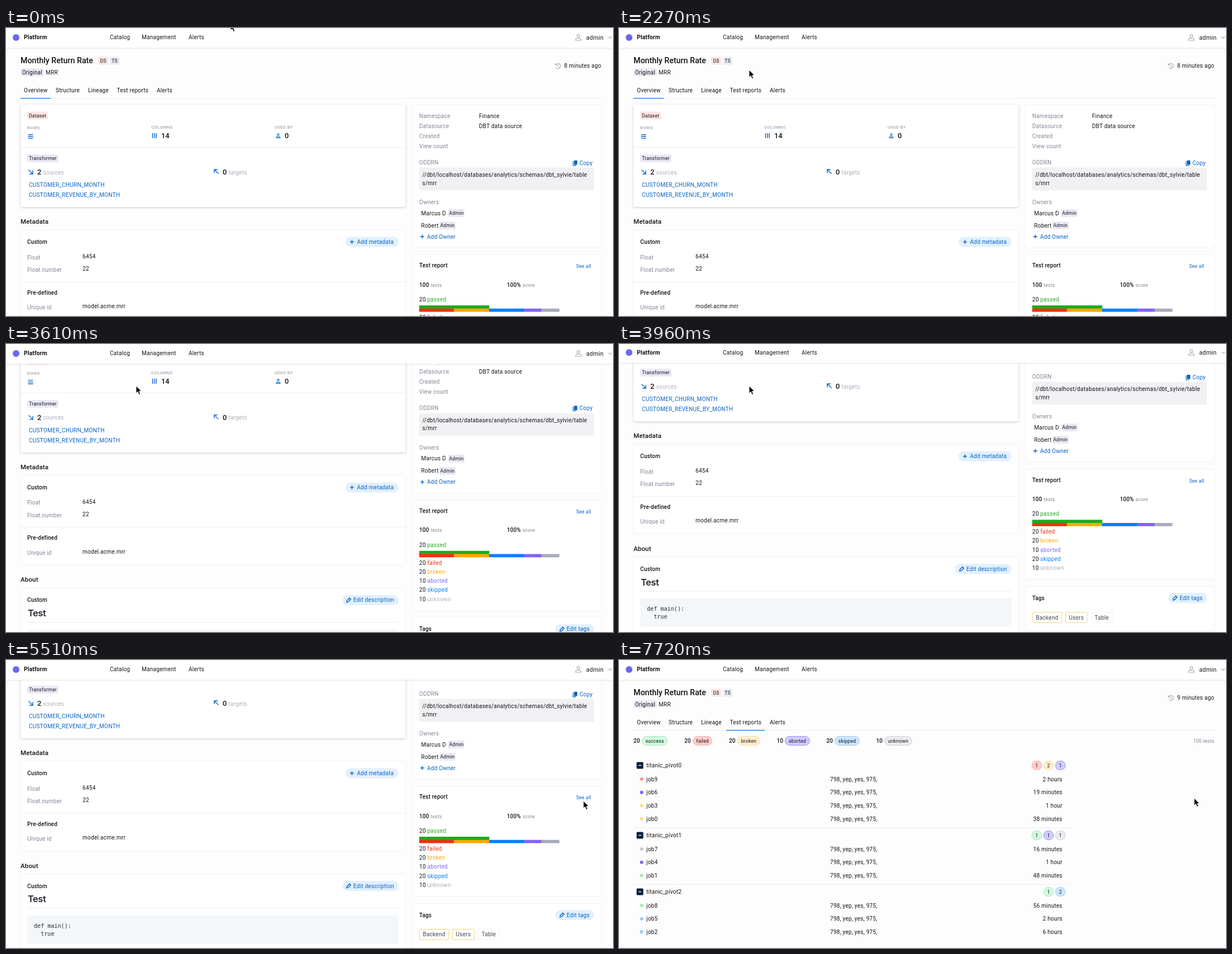
Animation, 1087 px wide and 515 px high, one loop 8000 ms. Source, as an HTML page:

```html
<!DOCTYPE html>
<html lang="en">
<head>
<meta charset="utf-8">
<title>Data catalog</title>
<style>
  html, body { margin: 0; width: 100%; height: 100%; overflow: hidden; background: #fdfdfe; }
  svg { display: block; width: 100%; height: 100%; }
  text { font-family: Roboto, "Liberation Sans", sans-serif; letter-spacing: .23px; fill: #131417; white-space: pre; }
  .med { font-weight: 500; letter-spacing: .14px; }
  .bold { font-weight: 700; letter-spacing: .15px; }
  .big { font-weight: 500; letter-spacing: 0; }
  .label { fill: #7f8695; }
  .pale { fill: #a9aeba; }
  .caps { fill: #9fa5b3; font-weight: 500; letter-spacing: .4px; }
  .link { fill: #0663c7; }
  .end { text-anchor: end; }
  .mid { text-anchor: middle; }
  .code { font-family: "DejaVu Sans Mono", monospace; letter-spacing: 0; fill: #24292e; }
  .h1 { font-family: Inter, sans-serif; font-weight: 600; letter-spacing: -.5px; fill: #24292e; }
  .card { fill: #fff; stroke: #f1f1f4; }
  .raised { fill: #fff; filter: drop-shadow(0 1px 2px rgba(20, 25, 50, .22)); }
  .bar { fill: #fff; filter: drop-shadow(0 1px 1px rgba(20, 25, 50, .12)); }
  .line { fill: none; stroke: #ededf1; }
  .ico { fill: none; stroke: #0663c7; stroke-width: 1.4; }
  .thin { fill: none; stroke: #0663c7; stroke-width: 1.1; }
  .grey { fill: none; stroke: #a3a8b4; stroke-width: 1.1; }
</style>
</head>
<body>
<svg viewBox="0 0 1087 515" preserveAspectRatio="none">
  <g id="page">
    <g id="body"></g>
    <g id="top"></g>
  </g>
  <rect id="status" x="-4" y="513.4" width="335" height="10" rx="3" fill="#e9e9ec"/>
  <path id="cursor" d="M0 0V13.2L3 10.4L5.3 15.6L7.6 14.6L5.4 9.6H9.6Z" fill="#000" stroke="#fff" stroke-width=".9"/>
</svg>
<script>
const $ = id => document.getElementById(id);
const BASE = 10.05, SMALL = 8.6;

// y is the middle of the capitals
const txt = (x, y, s, cls = '', size = BASE, fill = '') =>
  `<text x="${x}" y="${(y + size * .355).toFixed(2)}" font-size="${size}" class="${cls}"` +
  `${fill ? ` style="fill:${fill}"` : ''}>${s}</text>`;
const box = (x, y, x2, y2, fill, r = 0, stroke = 'none') =>
  `<rect x="${x}" y="${y}" width="${x2 - x}" height="${y2 - y}" rx="${r}" fill="${fill}" stroke="${stroke}"/>`;
const panel = (x, y, x2, y2, cls = 'card') =>
  `<rect x="${x}" y="${y}" width="${x2 - x}" height="${y2 - y}" rx="3" class="${cls}"/>`;
const path = (d, cls = 'ico') => `<path d="${d}" class="${cls}"/>`;
const plus = (x, y) => path(`M${x - 3.5} ${y}h7M${x} ${y - 3.5}v7`);
const pencil = (x, y) => path(`M${x - 3.5} ${y + 3.7}l.5 -2.8l4.6 -4.6l2.3 2.3l-4.6 4.6z`);
const pill = (x, y, x2, label, tx) =>
  box(x, y - 9, x2, y + 9, '#e2f0fd', 9) + txt(tx, y, label, 'link');
const badge = (x, y, x2, label, fill = '#e9e9f6', size = SMALL) =>
  box(x, y - 7, x2, y + 7, fill, 2) + txt((x + x2) / 2, y, label, 'mid', size);

const GREEN = ['#d1fadf', '#a8e8bc'], RED = ['#ffcccc', '#f7aeae'], YELLOW = ['#ffeecc', '#f8dea6'],
  PURPLE = ['#d1ccff', '#9a8ff0'], BLUE = ['#cce6ff', '#a0cbf3'], GREY = ['#ebebef', '#cfcfd7'];
const tag = (x, y, x2, label, [fill, edge]) =>
  box(x + .5, y - 8, x2 - .5, y + 8, fill, 8, edge) + txt((x + x2) / 2, y, label, 'mid', SMALL);

function header() {
  const y = 16.7;
  return panel(-5, -10, 1092, 35.5, 'bar') +
    '<circle cx="18" cy="17" r="6" fill="#6a68f2"/>' +
    txt(32, y, 'Platform', 'bold', 10.3) +
    txt(186, y, 'Catalog') + txt(243, y, 'Management') + txt(327, y, 'Alerts') +
    '<circle cx="1025" cy="14.3" r="2.4" class="grey"/>' +
    path('M1020 22v-1.2c0-3.4 10-3.4 10 0v1.2z', 'grey') +
    txt(1039, y, 'admin', '', 10.8) + path('M1079 15.5l3 3l3-3', 'grey');
}

function title(age, from, to) {
  const tabs = [[32, 'Overview'], [89, 'Structure'], [147, 'Lineage'], [198.4, 'Test reports'], [270, 'Alerts']];
  return txt(26, 58.3, 'Monthly Return Rate', 'big', 14.25) +
    badge(165, 58.5, 183, 'DS', '#fde4e2') + badge(186, 58.5, 203, 'TS') +
    badge(26.5, 79.3, 67, 'Original', '#e8e9f5', BASE) + txt(71, 79.3, 'MRR') +
    path('M984.5 65.5a4.6 4.6 0 1 1 0 5M983.5 63v3h3M988.3 65v3.2l2 1.2', 'grey') +
    txt(1066, 67.5, age + ' minutes ago', 'end') +
    tabs.map(([x, s]) => txt(x, 111.7, s)).join('') +
    path('M26 125.5H1066', 'line') + box(from, 125, to, 126.4, '#1483ea');
}

function leftColumn() {
  return panel(26, 137, 715.5, 320, 'raised') + path('M26 213.5H715', 'line') +
    badge(38, 156.5, 75, 'Dataset', '#fde4e2') +
    txt(38, 178.5, 'ROWS', 'caps', 7.6) + txt(260, 177.5, 'COLUMNS', 'caps', 7.6) +
    txt(481, 177.5, 'USED BY', 'caps', 7.6) +
    path('M39.5 191h9M39.5 194.2h9M39.5 197.4h9') + path('M262.5 188v9M265.8 188v9M269.1 188v9') +
    '<circle cx="487.5" cy="190.7" r="1.7" class="thin"/>' + path('M484 196.5v-.5c0-2.2 7-2.2 7 0v.5z', 'thin') +
    txt(278, 192.5, '14', 'big', 12.9) + txt(499, 192.5, '0', 'big', 12.9) +
    badge(38, 233, 94, 'Transformer') +
    path('M40.5 253.5l7 7M48 255v6h-6') + path('M380.5 260.5l-7 -7M373 259v-6h6') +
    txt(56, 257.5, '2', 'big', 12.9) + txt(66.5, 258, 'sources', 'pale') +
    txt(388, 257.5, '0', 'big', 12.9) + txt(398.5, 258, 'targets', 'pale') +
    txt(41, 280.5, 'CUSTOMER_CHURN_MONTH', 'link') +
    txt(41, 298.5, 'CUSTOMER_REVENUE_BY_MONTH', 'link') +

    txt(26, 346, 'Metadata', 'med', 11.5) + panel(26, 361.5, 715.5, 520.5) +
    path('M26 454H715', 'line') + txt(38, 382.5, 'Custom', 'med') +
    pill(608, 382.5, 703, 'Add metadata', 628.5) + plus(619.5, 382.5) +
    txt(38, 410, 'Float', 'label') + txt(137, 408.5, '6454') +
    txt(38, 432.5, 'Float.number', 'label') + txt(137, 430.5, '22') +
    txt(38, 473, 'Pre-defined', 'med') +
    txt(38, 499.5, 'Unique id', 'label') + txt(137, 497.5, 'model.acme.mrr') +

    txt(26, 547.5, 'About', 'med', 11.5) + panel(26, 562.5, 715.5, 720) +
    txt(38, 584, 'Custom', 'med') +
    pill(602, 584, 703, 'Edit description', 622) + pencil(613.5, 584) +
    txt(39, 607.5, 'Test', 'h1', 16.5) + path('M38 624H703', 'line') +
    box(38, 636.5, 703, 688, '#f4f7fa', 2) +
    txt(50, 655, 'def main():', 'code', 10.1) + txt(50, 669.5, '  true', 'code', 10.1);
}

function rightColumn() {
  const info = [['Namespace', 'Finance'], ['Datasource', 'DBT data source'], ['Created', ''], ['View count', '']];
  const bars = [[740, '#f2300f'], [802.5, '#ffa800'], [865, '#0080ff'], [928, '#8463fa'], [959, '#a8abb8'], [991]];
  const stats = [[20, 'failed', '#f2300f'], [20, 'broken', '#ffa800'], [10, 'aborted', '#8463fa'],
    [20, 'skipped', '#0080ff'], [10, 'unknown', '#adb0ba']];
  return panel(728, 137, 1066, 393) +
    info.map(([k, v], i) => txt(740, 157.7 + i * 17.8, k, 'label') + txt(847, 157.7 + i * 17.8, v)).join('') +
    txt(740, 240.5, 'ODDRN', 'label') + txt(1027, 241, 'Copy', 'link') +
    box(1017, 236.7, 1023, 244.5, '#0663c7', 1) + path('M1015.5 238.3v7.6h5.5', 'thin') +
    box(740, 249.5, 1053, 290.5, '#f1f1f4', 2) +
    txt(745.5, 262.5, '//dbt/localhost/databases/analytics/schemas/dbt_sylvie/table') +
    txt(745.5, 277, 's/mrr') +
    txt(740, 311.5, 'Owners', 'label') +
    txt(743.5, 331, 'Marcus D') + badge(792, 331, 821, 'Admin') +
    txt(743.5, 353, 'Robert') + badge(776, 353, 805, 'Admin') +
    plus(745.5, 373) + txt(754, 373, 'Add Owner', 'link') +

    panel(728, 405.5, 1066, 602.5) + txt(740, 424.8, 'Test report', 'med') +
    '<rect id="hover" x="1016" y="417.5" width="37.5" height="17.5" rx="2"/>' +
    txt(1021, 426.3, 'See all', 'link', SMALL) +
    txt(740, 459, '100', 'med') + txt(760.5, 459.5, 'tests', 'label', SMALL) +
    txt(897, 459, '100%', 'med') + txt(925, 459.5, 'score', 'label', SMALL) +
    txt(740, 485.5, '20') + txt(754.5, 485.5, 'passed', '', BASE, '#1faa1f') +
    box(740, 496, 865.5, 502, '#1faa1f') +
    bars.slice(0, -1).map(([x, c], i) => box(x, 501.7, bars[i + 1][0], 507.5, c)).join('') +
    stats.map(([n, s, c], i) =>
      txt(740, 517.4 + i * 16.2, n) + txt(754.5, 517.4 + i * 16.2, s, '', BASE, c)).join('') +

    panel(728, 615, 1066, 695) + txt(740, 636, 'Tags', 'med') +
    pill(984, 636, 1053, 'Edit tags', 1004) + pencil(995.5, 636) +
    [[740, 793, 'Backend', '#f6d27a'], [799, 839, 'Users', '#f6d27a'], [845, 884, 'Table', '#f1f1f4']]
      .map(([a, b, s, c]) => box(a + .5, 661.5, b, 680, '#fff', 2.5, c) +
        txt((a + b) / 2, 670.7, s, 'mid', BASE, '#42464f')).join('');
}

function reports() {
  const totals = [[26, 41, 87, 20, 'success', GREEN], [117, 132, 167, 20, 'failed', RED],
    [197, 212, 253, 20, 'broken', YELLOW], [282.5, 297, 342, 10, 'aborted', PURPLE],
    [371.5, 386, 431, 20, 'skipped', BLUE], [460.5, 475, 525, 10, 'unknown', GREY]];
  const red = '#ff9090', violet = '#7a62fa', amber = '#ffdb8f', grey = '#c4c6d0', green = '#a0eda6', blue = '#90caff';
  const groups = [
    [188, [[1, RED], [2, YELLOW], [1, PURPLE]],
      [[9, red, '2 hours'], [6, violet, '19 minutes'], [3, amber, '1 hour'], [0, amber, '38 minutes']]],
    [313, [[1, GREEN], [1, PURPLE], [1, GREY]],
      [[7, grey, '16 minutes'], [4, violet, '1 hour'], [1, green, '48 minutes']]],
    [414, [[1, GREEN], [2, BLUE]],
      [[8, green, '56 minutes'], [5, blue, '2 hours'], [2, blue, '6 hours']]]
  ];
  return totals.map(([x, a, b, n, s, c]) => txt(x, 144.5, n, 'med') + tag(a, 144.5, b, s, c)).join('') +
    txt(1066, 144.5, '100 tests', 'label end', SMALL) +
    groups.map(([y, tags, jobs], g) =>
      (g ? path(`M26 ${y - 12.5}H807`, 'line') : '') +
      box(31.5, y - 5.5, 43.5, y + 6.5, '#0a1f44', 1.5) + box(35, y - .2, 40, y + 1.1, '#fff') +
      txt(49, y, 'titanic_pivot' + g) +
      tags.map(([n, c], i) => {
        const x = 790.5 - 21.2 * (tags.length - 1 - i);
        return tag(x - 9.3, y + .5, x + 9.3, n, c);
      }).join('') +
      jobs.map(([n, c, age], i) => {
        const jy = y + 25 + i * 23.65;
        return `<circle cx="40.5" cy="${jy}" r="3" fill="${c}"/>` + txt(49, jy, 'job' + n) +
          txt(378, jy, '798, yep, yes, 975,') + txt(794, jy, age, 'end');
      }).join('')).join('');
}

$('top').innerHTML = header();
$('body').innerHTML =
  `<g id="overview">${title(8, 26, 80)}${leftColumn()}${rightColumn()}</g>` +
  `<g id="result">${title(9, 192, 261)}<g id="rows">${reports()}</g></g>`;

// bursts of movement: first step, last step, number of steps
const BURSTS = [[660, 1460, 10], [1640, 1640, 1], [1820, 2270, 6], [3170, 3960, 8], [4080, 4200, 2],
  [4410, 5150, 8], [5240, 5960, 9], [6590, 6950, 5], [7220, 7720, 6]];

function stepTime(t) {
  let at = 0;
  for (const [a, b, n] of BURSTS) {
    if (t < a) break;
    const gap = n > 1 ? (b - a) / (n - 1) : 1;
    at = a + Math.min(n - 1, Math.floor((t - a) / gap + .12)) * gap;
  }
  return at;
}

// rows of [time, value, ...], joined by straight lines
function along(keys, t) {
  const i = keys.findIndex(k => k[0] > t);
  if (i === 0) return keys[0].slice(1);
  if (i < 0) return keys[keys.length - 1].slice(1);
  const a = keys[i - 1], b = keys[i], u = (t - a[0]) / (b[0] - a[0]);
  return a.slice(1).map((v, j) => v + (b[j + 1] - v) * u);
}

const POINTER = [[0, 402, -9], [570, 402, -9], [750, 362, -4], [930, 255, 6], [1100, 160, 12], [1282, 107, 15],
  [1460, 89, 17], [1639, 89, 17], [1640, 90, 17.5], [1730, 90, 17.5], [1910, 122, 30], [2090, 195, 58],
  [2270, 233, 75], [4300, 233, 75], [4516, 300, 92], [4727, 620, 165], [4938, 955, 228], [5150, 1068, 245],
  [5330, 1046, 248], [5510, 1034, 252], [5700, 1036, 255], [5960, 1033, 249], [6500, 1033, 249], [6950, 1030, 247]];
const SCROLL = [[3169, 0], [3170, 2.3], [3283, 14], [3396, 43], [3509, 84], [3621, 126], [3734, 158], [3847, 176],
  [3960, 181.7], [4080, 182.5], [4200, 183], [4400, 183], [4622, 180]];
const MAX = 180, DONE = 7500;

function draw(ms) {
  const t = stepTime(ms), done = t >= DONE;
  const [x, y] = along(POINTER, t);
  const s = done ? 0 : along(SCROLL, t)[0];
  $('cursor').setAttribute('transform', `translate(${x} ${y})`);
  $('page').setAttribute('transform', `translate(0 ${-Math.max(0, s - MAX)})`);
  $('body').setAttribute('transform', `translate(0 ${-Math.min(s, MAX)})`);
  $('overview').style.display = done ? 'none' : '';
  $('result').style.display = done ? '' : 'none';
  $('rows').style.display = t >= 7600 ? '' : 'none';
  $('hover').setAttribute('fill', t < 6590 ? 'none' : t < 7220 ? '#e5f2ff' : '#c9e2fa');
  $('status').style.opacity = t < 6590 ? 0 : done ? .5 : 1;
}

const start = performance.now();
function tick() {
  draw((performance.now() - start) % 8000);
  requestAnimationFrame(tick);
}
tick();
</script>
</body>
</html>
```
